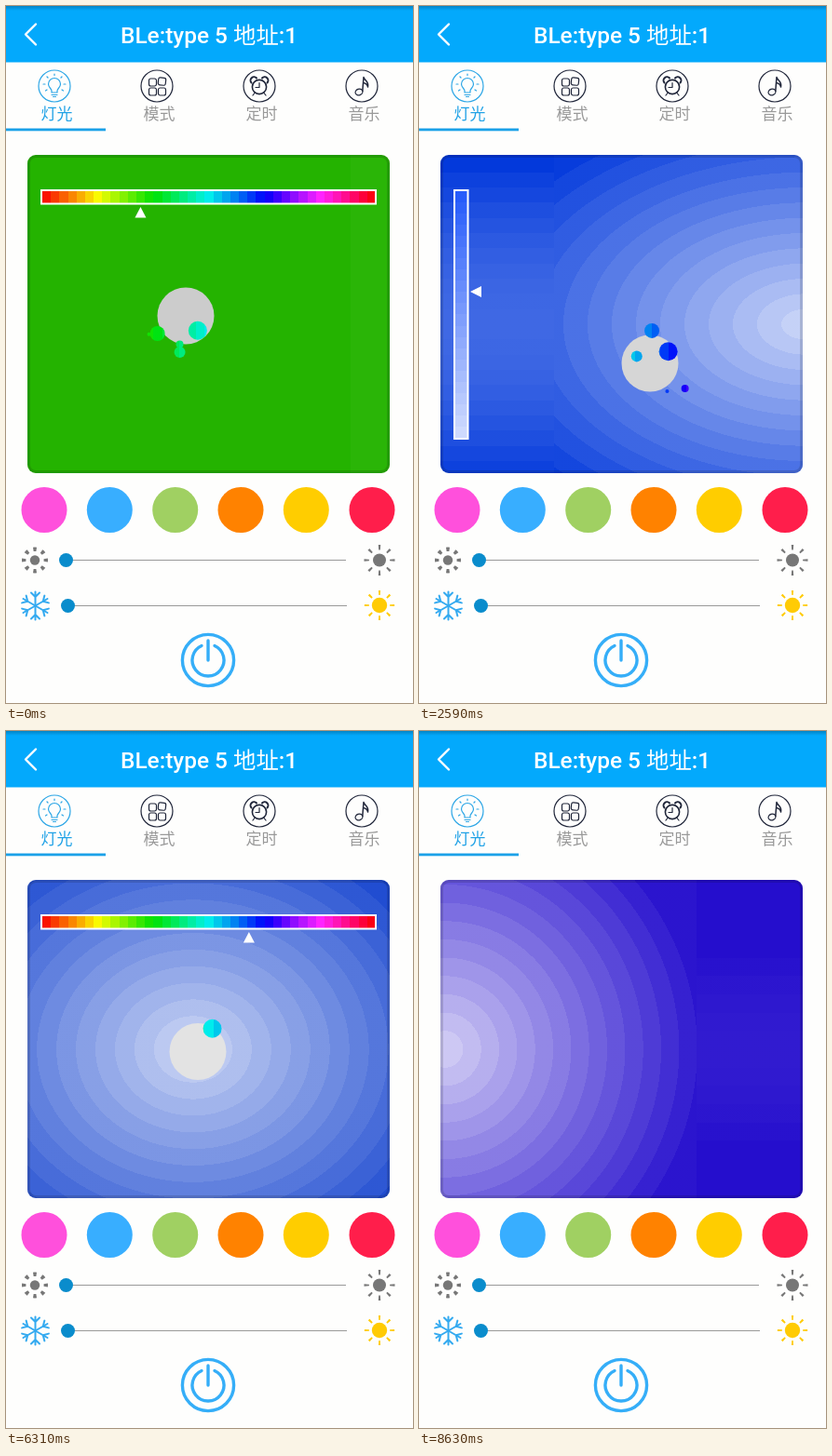
Animation of 437 by 749 pixels, one loop 8730 ms. Source, as an HTML page with a canvas:

```html
<!DOCTYPE html>
<html lang="zh">
<head>
<meta charset="utf-8">
<title>Light control</title>
<style>
  html, body { margin: 0; width: 437px; height: 749px; overflow: hidden; background: #fefefd; }
  svg, canvas { position: absolute; left: 0; top: 0; display: block; }
  text { font-family: Roboto, "Noto Sans CJK SC", "Noto Sans CJK", sans-serif; }
  .title { font-size: 24.4px; font-weight: 500; fill: #fff; }
  .tab { font-size: 17px; fill: #999; text-anchor: middle; }
  .tab.on { fill: #1ea1e6; font-weight: 500; }
  .line { fill: none; stroke-linecap: round; stroke-linejoin: round; }
  .rays { fill: none; }
</style>
</head>
<body>
<svg width="437" height="749" viewBox="0 0 437 749">
  <defs>
    <linearGradient id="shade" x2="0" y2="1">
      <stop stop-color="#0284c6"/><stop offset="1" stop-color="#03a9fc"/>
    </linearGradient>
    <path id="arm" d="M0 0V-15M-4.5-14L0-9.5L4.5-14"/>
  </defs>

  <rect width="437" height="60.5" fill="#03a9fc"/>
  <rect width="437" height="5" fill="url(#shade)"/>
  <path class="line" d="M32 19.5L21 30.5L32 41.5" stroke="#fff" stroke-width="2.4"/>
  <text class="title" x="123" y="40">BLe:type 5 地址:1</text>

  <g class="line" stroke="#2ca6e6" stroke-width="1.2" transform="translate(52 86)">
    <circle r="17"/>
    <path d="M-3 7V5C-3 3-6.5 1.5-6.5-2A6.5 6.5 0 0 1 6.5-2C6.5 1.5 3 3 3 5V7ZM-3 9.5H3M-1.5 11.5H1.5"/>
    <path d="M0-11.5V-13M-7-9L-8-10M7-9L8-10M-10-2H-12M10-2H12M-8 4L-9.5 5M8 4L9.5 5"/>
  </g>
  <g class="line" stroke="#20263a" stroke-width="1.2">
    <g transform="translate(162 86)">
      <circle r="17"/>
      <rect x="-8.5" y="-8" width="8" height="8" rx="2"/>
      <rect x="1.5" y="-9" width="8" height="8" rx="2" transform="rotate(6 5 -5)"/>
      <rect x="-8.5" y="2" width="8" height="8" rx="2"/>
      <rect x="1.5" y="2" width="8" height="8" rx="2"/>
    </g>
    <g transform="translate(272 86)">
      <circle r="17"/>
      <circle cy="1" r="7.6" stroke-width="1.6"/>
      <path d="M0-3.5V1.5H-4M-5 7.5L-7 10M5 7.5L7 10"/>
      <path d="M-8.5-3.5A3.6 3.6 0 0 1-3-8.5M8.5-3.5A3.6 3.6 0 0 0 3-8.5" stroke-width="2"/>
    </g>
    <g transform="translate(382 86)">
      <circle r="17"/>
      <ellipse cx="-3" cy="6.5" rx="4" ry="3.3" transform="rotate(-20 -3 6.5)"/>
      <path d="M.8 5.5L2-9.5C3-5.5 8-5 6.5 1C6-2 4-3 1.6-3.5" stroke-width="1.5"/>
    </g>
  </g>
  <text class="tab on" x="54.5" y="121.5">灯光</text>
  <text class="tab" x="164.5" y="121.5">模式</text>
  <text class="tab" x="274.5" y="121.5">定时</text>
  <text class="tab" x="384.5" y="121.5">音乐</text>
  <rect y="131.5" width="107" height="2.8" fill="#1ba1e8"/>

  <circle cx="41" cy="541.5" r="24.5" fill="#ff50dc"/>
  <circle cx="111.3" cy="541.5" r="24.5" fill="#38aeff"/>
  <circle cx="181.7" cy="541.5" r="24.5" fill="#a0d062"/>
  <circle cx="252" cy="541.5" r="24.5" fill="#ff8200"/>
  <circle cx="322.3" cy="541.5" r="24.5" fill="#ffcd00"/>
  <circle cx="393" cy="541.5" r="24.5" fill="#ff1e4b"/>

  <path d="M64 595.5H365M66 644.5H366" stroke="#999"/>
  <circle cx="64.5" cy="595.5" r="7.5" fill="#0a8ccc"/>
  <circle cx="66.5" cy="644.5" r="7.5" fill="#0a8ccc"/>

  <g transform="translate(31 595.5)" fill="#777" stroke="#777">
    <circle r="5.2" stroke="none"/>
    <circle class="rays" r="11.8" pathLength="360" stroke-width="4.4" stroke-dasharray="17 28" stroke-dashoffset="8.5"/>
  </g>
  <g transform="translate(401 595.5)" fill="#777" stroke="#777">
    <circle r="7" stroke="none"/>
    <circle class="rays" r="13.8" pathLength="360" stroke-width="5.4" stroke-dasharray="9 36" stroke-dashoffset="4.5"/>
  </g>
  <g transform="translate(401 644)" fill="#ffcb05" stroke="#ffcb05">
    <circle r="8.2" stroke="none"/>
    <circle class="rays" r="13.6" pathLength="360" stroke-width="5" stroke-dasharray="8 37" stroke-dashoffset="4"/>
  </g>
  <g class="line" transform="translate(31.5 644.5)" stroke="#34aaf0" stroke-width="2">
    <use href="#arm"/><use href="#arm" transform="rotate(60)"/><use href="#arm" transform="rotate(120)"/>
    <use href="#arm" transform="rotate(180)"/><use href="#arm" transform="rotate(240)"/>
    <use href="#arm" transform="rotate(300)"/>
  </g>
  <g class="line" transform="translate(217 703)" stroke="#35aef8" stroke-width="3.4">
    <circle r="27.6"/>
    <path d="M-7-15.5A17 17 0 1 0 7-15.5M0-21V0"/>
  </g>
</svg>
<canvas id="panel" width="437" height="749"></canvas>

<script>
const LOOP = 8730, TICKS = 65;
const MIDDLE = 342, REACH = 270;   // height of the glow, and where it stops fading sideways
const ctx = document.getElementById('panel').getContext('2d');

// Each row: tick, then the values at that tick.
const ballPath = [[0, 193, 333], [7, 281, 357], [19, 248, 384], [31, 179, 386], [40, 171, 335], [52, 241, 354]];
const huePath = [[0, 108], [7, 225], [46, 225], [52, 5], [60, 247]];
const glowPath = [[0, 640, 200, 380], [19, 415, 390, 245], [31, 345, 335, 245], [64, 28, 290, 295]];

function at(path, n) {
  const i = path.findIndex(row => row[0] > n);
  if (i < 1) return path.at(i).slice(1);
  const a = path[i - 1], b = path[i], k = (n - a[0]) / (b[0] - a[0]);
  return a.slice(1).map((v, j) => v + (b[j + 1] - v) * k);
}

const clamp = (v, low, high) => Math.min(high, Math.max(low, v));
const bump = (h, mid) => Math.max(0, 1 - Math.abs(h - mid) / 50);

// The finger is down twice; bar and ball fade when it lifts.
const touch = n => clamp(((n < 46 ? 41.6 : 61) - n) / 2, 0, 1);

function random(seed) {
  const v = Math.sin(seed * 127.1 + 3.7) * 43758.5453;
  return v - Math.floor(v);
}

function stepped(gradient, n, color) {
  for (let i = 0; i < n; i++) {
    const c = color((i + .5) / n);
    gradient.addColorStop(i / n, c);
    gradient.addColorStop((i + 1) / n, c);
  }
  return gradient;
}

const rainbow = stepped(ctx.createLinearGradient(39, 0, 397, 0), 39, k => {
  const h = k * 360;
  return `hsl(${h}, 100%, ${49 - 5 * bump(h, 120) - 3 * bump(h, 185) + 8 * bump(h, 300)}%)`;
});

function circle(x, y, r, fill) {
  ctx.fillStyle = fill;
  ctx.beginPath();
  ctx.arc(x, y, r, 0, 7);
  ctx.fill();
}

function bar(w, h, fill) {
  ctx.fillStyle = '#fff';
  ctx.fillRect(37, 197, w, h);
  ctx.fillStyle = fill;
  ctx.fillRect(39, 199, w - 4, h - 4);
}

function triangle(...p) {
  ctx.fillStyle = '#fff';
  ctx.beginPath();
  for (let i = 0; i < 6; i += 2) ctx.lineTo(p[i], p[i + 1]);
  ctx.fill();
}

function drawGlow(n) {
  const [cx, rx, ry] = at(glowPath, n);
  const white = d => `rgba(255, 255, 255, ${.8 * Math.max(0, 1 - d)})`;
  const edge = REACH / rx;
  ctx.save();
  ctx.translate(cx, MIDDLE);
  ctx.scale(rx, ry);
  ctx.fillStyle = stepped(ctx.createRadialGradient(0, 0, 0, 0, 0, 1), 15, white);
  ctx.fillRect(-edge, -1, 2 * edge, 2);
  if (edge < 1) {
    ctx.fillStyle = stepped(ctx.createLinearGradient(0, -1, 0, 1), 30, k => white(Math.hypot(edge, 2 * k - 1)));
    ctx.fillRect(-edge - 2, -1, 2, 2);
    ctx.fillRect(edge, -1, 2, 2);
  }
  ctx.restore();
}

function drawBar(n, hue, ballY) {
  if (n < 13 || n > 44) {
    const x = 37 + hue * .995;
    bar(361, 16.5, rainbow);
    triangle(x, 216, x - 6, 227.5, x + 6, 227.5);
  } else {
    const y = clamp(252 + (ballY - 335) * 1.12, 199, 464);
    bar(16.5, 269, stepped(ctx.createLinearGradient(0, 199, 0, 464), 22,
      k => `hsl(${hue}, 96%, ${56 + 35 * k}%)`));
    triangle(55, y, 67, y - 6, 67, y + 6);
  }
}

// A dot appears near the ball on each tick, stays there and shrinks.
function drawDots(n) {
  for (let age = 4; age >= 0; age--) {
    const born = n - age;
    if (touch(born) < 1) continue;
    const [x, y] = at(ballPath, born);
    const angle = random(born) * 2 * Math.PI, far = 18 + 34 * random(born + 99);
    circle(x + far * Math.cos(angle), y + far * Math.sin(angle), 10 - 2 * age, rainbow);
  }
}

function draw(n) {
  const [hue] = at(huePath, n), [x, y] = at(ballPath, n);
  const gray = 204 + n / 2;

  ctx.clearRect(0, 0, 437, 749);
  ctx.save();
  ctx.beginPath();
  ctx.roundRect(23, 160, 389, 342, 9);
  ctx.clip();
  ctx.fillStyle = `hsl(${hue}, ${n < 46 ? 100 : 87}%, ${43 - 10.5 * bump(hue, 120)}%)`;
  ctx.fillRect(23, 160, 389, 342);
  drawGlow(n);
  ctx.beginPath();
  ctx.roundRect(23, 160, 389, 342, 9);
  ctx.strokeStyle = 'rgba(0, 0, 0, .14)';
  ctx.lineWidth = 6;
  ctx.stroke();

  ctx.globalAlpha = touch(n);
  drawBar(n, hue, y);
  circle(x, y, 30.5, `rgb(${gray}, ${gray}, ${gray})`);
  ctx.globalAlpha = 1;
  drawDots(n);
  ctx.restore();
}

let shown = -1;
function frame() {
  const n = Math.floor(performance.now() % LOOP / LOOP * TICKS);
  if (n !== shown) draw(shown = n);
  requestAnimationFrame(frame);
}
frame();
</script>
</body>
</html>
```
